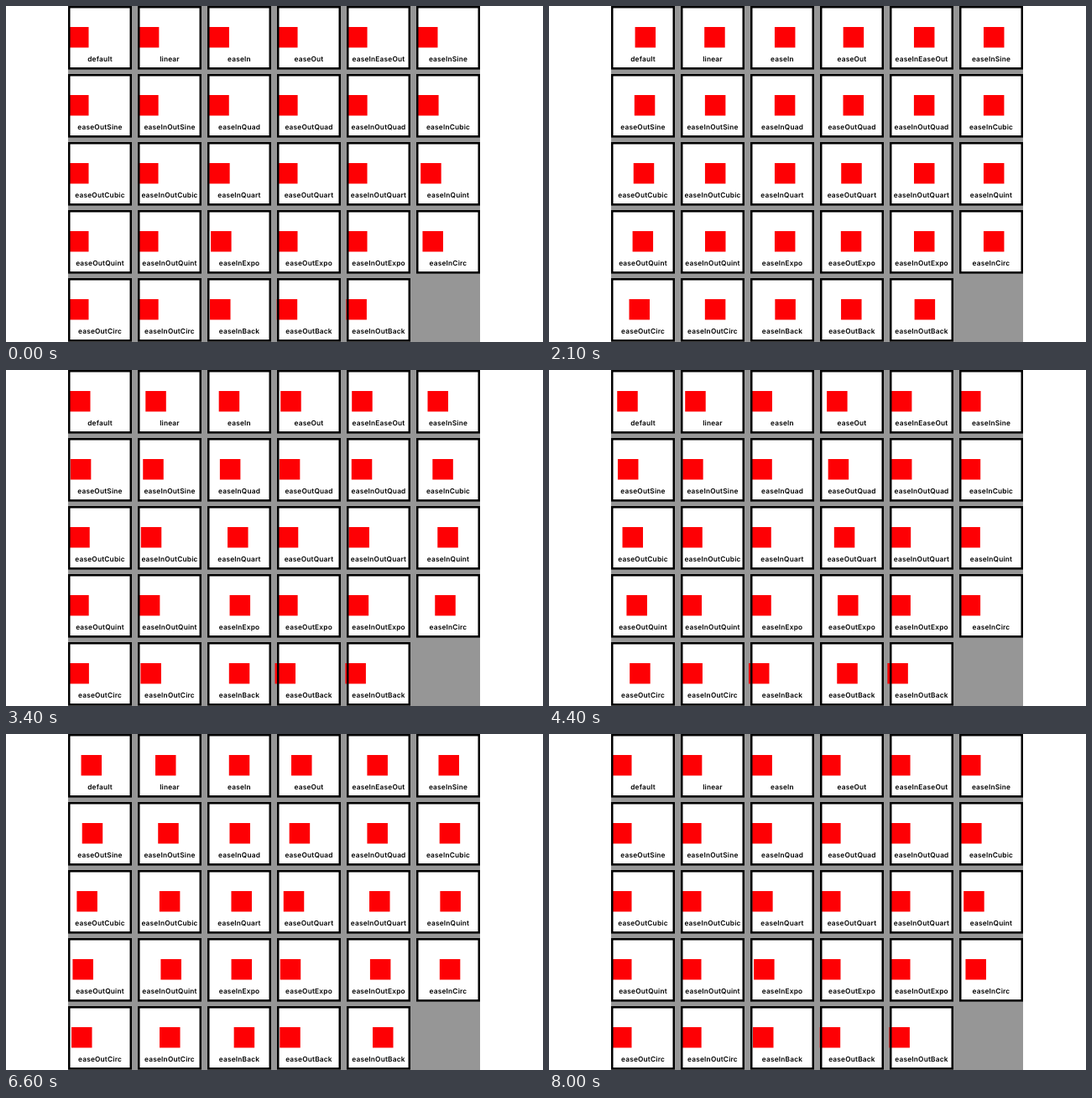
An HTML page for the animation above (8100 ms loop, 640 by 400 pixels).

```html
<!DOCTYPE html>
<html lang="en">
<head>
<meta charset="utf-8">
<title>Easing curves</title>
<style>
  html, body { margin: 0; width: 100%; height: 100%; overflow: hidden; background: #fff; }
  svg { display: block; width: 640px; height: 400px; }
  text {
    font: 600 8.3px Inter, Roboto, sans-serif;
    letter-spacing: .2px;
    text-anchor: middle;
    text-rendering: geometricPrecision;
  }
</style>
</head>
<body>
<svg id="stage" viewBox="0 0 640 400"></svg>
<script>
const CURVES = {
  default: [.25, .1, .25, 1],
  linear: [0, 0, 1, 1],
  easeIn: [.42, 0, 1, 1],
  easeOut: [0, 0, .58, 1],
  easeInEaseOut: [.42, 0, .58, 1],
  easeInSine: [.47, 0, .745, .715],
  easeOutSine: [.39, .575, .565, 1],
  easeInOutSine: [.445, .05, .55, .95],
  easeInQuad: [.55, .085, .68, .53],
  easeOutQuad: [.25, .46, .45, .94],
  easeInOutQuad: [.455, .03, .515, .955],
  easeInCubic: [.55, .055, .675, .19],
  easeOutCubic: [.215, .61, .355, 1],
  easeInOutCubic: [.645, .045, .355, 1],
  easeInQuart: [.895, .03, .685, .22],
  easeOutQuart: [.165, .84, .44, 1],
  easeInOutQuart: [.77, 0, .175, 1],
  easeInQuint: [.755, .05, .855, .06],
  easeOutQuint: [.23, 1, .32, 1],
  easeInOutQuint: [.86, 0, .07, 1],
  easeInExpo: [.95, .05, .795, .035],
  easeOutExpo: [.19, 1, .22, 1],
  easeInOutExpo: [1, 0, 0, 1],
  easeInCirc: [.6, .04, .98, .335],
  easeOutCirc: [.075, .82, .165, 1],
  easeInOutCirc: [.785, .135, .15, .86],
  easeInBack: [.6, -.28, .735, .045],
  easeOutBack: [.175, .885, .32, 1.275],
  easeInOutBack: [.68, -.55, .265, 1.55]
};
const LOOP = 8100, TICK = 100, SWEEP = 2000;
const COLS = 6, LEFT = 74, STEP_X = 83, STEP_Y = 81;
const BOX_W = 76, BOX_H = 75.6, LINE = 2.5, SIDE = 24.5, TRAVEL = 29;

const stage = document.getElementById('stage');

function add(tag, attrs) {
  const el = document.createElementNS('http://www.w3.org/2000/svg', tag);
  for (const key in attrs) el.setAttribute(key, attrs[key]);
  return stage.appendChild(el);
}

function axis(u, a, b) {
  const v = 1 - u;
  return 3 * v * v * u * a + 3 * v * u * u * b + u * u * u;
}

// Solve the curve's x for u by bisection, then read off y.
function ease([x1, y1, x2, y2], p) {
  let lo = 0, hi = 1;
  for (let i = 0; i < 24; i++) {
    const mid = (lo + hi) / 2;
    if (axis(mid, x1, x2) < p) lo = mid; else hi = mid;
  }
  return axis((lo + hi) / 2, y1, y2);
}

add('rect', { x: LEFT, y: 0, width: 491, height: 400, fill: '#969696' });

const movers = Object.entries(CURVES).map(([name, curve], i) => {
  const x = LEFT + (i % COLS) * STEP_X;
  const y = Math.floor(i / COLS) * STEP_Y;
  const box = {
    x: x + LINE / 2, y: y + LINE / 2,
    width: BOX_W - LINE, height: BOX_H - LINE
  };
  add('rect', { ...box, fill: '#fff' });
  const square = add('rect', { x, y: y + 25, width: SIDE, height: SIDE, fill: '#fe0004' });
  add('rect', { ...box, fill: 'none', stroke: '#000', 'stroke-width': LINE });
  add('text', { x: x + BOX_W / 2, y: y + 66 }).textContent = name;
  return { square, curve, x };
});

function draw(ms) {
  const t = Math.floor((ms % LOOP) / TICK) * TICK;
  const lag = .029 - .009 * Math.sin(Math.PI * t / 8000);
  const phase = t / SWEEP - lag + 2;
  const turn = Math.floor(phase);
  for (const { square, curve, x } of movers) {
    const e = ease(curve, phase - turn);
    square.setAttribute('x', (x + TRAVEL * (turn % 2 ? 1 - e : e)).toFixed(2));
  }
}

const start = performance.now();
function loop() {
  draw(performance.now() - start);
  requestAnimationFrame(loop);
}
loop();
</script>
</body>
</html>
```
